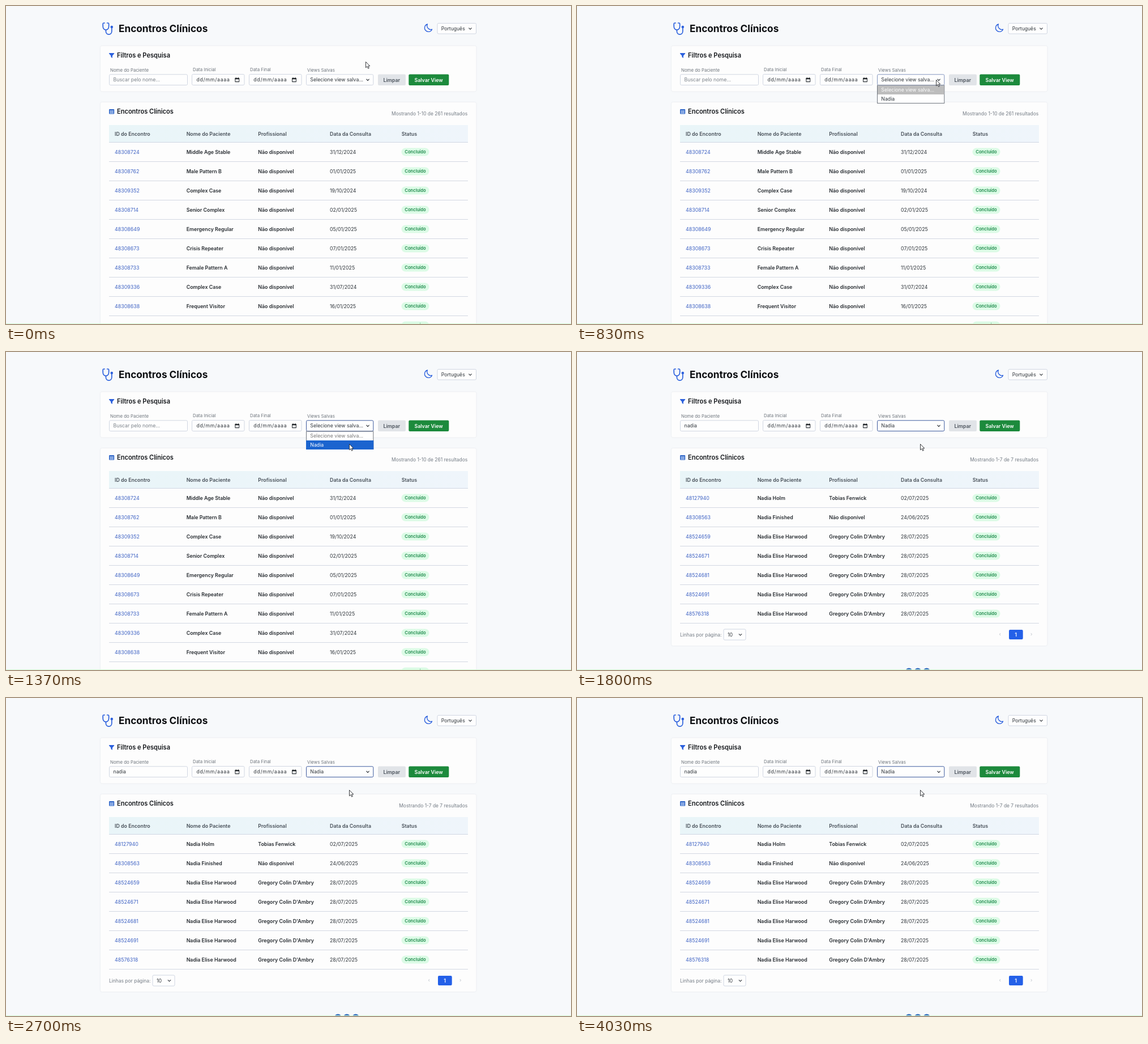
Recreate the animation shown at these times as an HTML page. Size 998x561 px, loop 4060 ms.

```html
<!DOCTYPE html>
<html lang="pt">
<head>
<meta charset="utf-8">
<title>Encontros Clínicos</title>
<style>
  html, body { margin: 0; width: 100%; height: 100%; overflow: hidden; background: #f7f9fb; }
  svg { display: block; width: 998px; height: 561px; }
  text { font: 400 8.75px Inter, "Open Sans", sans-serif; fill: #2f353b; white-space: pre; }
  .title { font-size: 17.2px; font-weight: 700; fill: #0b0d10; }
  .section { font-size: 11.05px; font-weight: 600; fill: #15181c; }
  .label { font-size: 7.85px; fill: #6d747c; }
  .hint { fill: #7a8189; }
  .date { letter-spacing: .7px; }
  .cell, .head, .btn { font-size: 8.85px; font-weight: 600; }
  .cell { fill: #272c31; }
  .head { fill: #474f58; }
  .day { font-size: 8.8px; }
  .id { font-size: 8.85px; fill: #3f63c4; }
  .pill { font-size: 7.6px; font-weight: 600; fill: #1f8a4c; }
  .note { font-size: 8.45px; fill: #737b84; }
  .end { text-anchor: end; }
  .mid { text-anchor: middle; }
  .white { fill: #fff; }
  .card { fill: #fdfdfd; filter: drop-shadow(0 .5px 1.2px rgb(60 70 90 / .13)); }
  .box { fill: #fefefe; stroke: #d0d6e2; }
  .icon { fill: none; stroke: #2b60dd; stroke-width: 1.7; stroke-linecap: round; stroke-linejoin: round; }
  .thin { fill: none; stroke: #33383e; stroke-width: 1.1; stroke-linecap: round; stroke-linejoin: round; }

  .before, .after, .idle, .chosen, .menu, .rest, .hover { animation: 4060ms step-end infinite; }
  .before { animation-name: before; }
  .after { animation-name: after; }
  .idle { animation-name: idle; }
  .chosen { animation-name: chosen; }
  .menu { animation-name: menu; }
  .rest { animation-name: rest; }
  .hover { animation-name: hover; }
  .focus { animation: focus 4060ms linear infinite; }
  .cursor { animation: move 4060ms ease-in-out infinite; }
  @keyframes before { 0% { opacity: 1 } 41.87%, 100% { opacity: 0 } }
  @keyframes after { 0% { opacity: 0 } 41.87%, 100% { opacity: 1 } }
  @keyframes idle { 0% { opacity: 1 } 40.15%, 100% { opacity: 0 } }
  @keyframes chosen { 0% { opacity: 0 } 40.15%, 100% { opacity: 1 } }
  @keyframes menu { 0% { opacity: 0 } 18.97% { opacity: 1 } 40.15%, 100% { opacity: 0 } }
  @keyframes rest { 0% { opacity: 1 } 27.8%, 100% { opacity: 0 } }
  @keyframes hover { 0% { opacity: 0 } 27.8%, 100% { opacity: 1 } }
  @keyframes focus { 0%, 18.5% { stroke: #d0d6e2 } 22.2%, 100% { stroke: #3d5a9e } }
  @keyframes move {
    0%, .74% { transform: translate(635px, 98px) }
    10.59%, 22.17% { transform: translate(634px, 130px) }
    30.79%, 100% { transform: translate(606px, 162px) }
  }
</style>
</head>
<body>
<svg viewBox="0 0 998 561">
  <defs>
    <linearGradient id="bar">
      <stop offset="0" stop-color="#e9f5f8"/>
      <stop offset="1" stop-color="#eff5fb"/>
    </linearGradient>
    <path id="chevron" class="thin" d="M-2.3-1.1 0 1.2 2.3-1.1"/>
    <g id="calendar">
      <path class="thin" stroke-linecap="butt" d="M.6 1.6h6.8v6H.6z"/>
      <path d="M.4 1h7.2v2.2H.4zM1.5 0h1.2v1.2H1.5zM5.3 0h1.2v1.2H5.3z" fill="#24282c"/>
    </g>
  </defs>
  <rect width="998" height="561" fill="#f7f9fb"/>

  <!-- Page header -->
  <path class="icon" d="M174.2 30h-1.6q-1.4 0-1.4 1.6v4.2c0 4 2.5 6.3 5.2 6.3s5.2-2.3 5.2-6.3v-4.2q0-1.6-1.4-1.6h-1.6M176.4 42.3v2.2c0 3.600 2.400 5.600 5.200 5.600s5.200-2 5.200-5.600v-5.200"/>
  <circle cx="186.800" cy="37" r="2.300" fill="#2b60dd"/>
  <text class="title" x="199" y="46.200">Encontros Clínicos</text>
  <path class="icon" style="stroke-width:1.300" d="M744.500 32a6.800 6.800 0 1 0 8 9.200 6.600 6.600 0 0 1-8-9.200z"/>
  <rect class="box" x="762" y="30.500" width="68.500" height="18.500" rx="2"/>
  <text x="768.800" y="43.100" style="font-size:8.650px">Português</text>
  <use href="#chevron" x="820" y="40"/>

  <!-- Filters -->
  <rect class="card" x="167" y="70.500" width="663.500" height="80" rx="3"/>
  <path d="M182.300 83h8.600q.7.400.2 1l-3.200 3.800v4l-2.600-1.800v-2.200l-3.300-3.800q-.4-.7.300-1z" fill="#2b60dd"/>
  <text class="section" x="196" y="91.300">Filtros e Pesquisa</text>
  <text class="label" x="184" y="116.200">Nome do Paciente</text>
  <text class="label" x="330" y="115.400">Data Inicial</text>
  <text class="label" x="431" y="115.400">Data Final</text>
  <text class="label" x="532" y="116.200">Views Salvas</text>
  <rect class="box" x="182.500" y="120.800" width="138" height="18.700" rx="2"/>
  <text class="hint before" x="189.500" y="133.400">Buscar pelo nome...</text>
  <text class="after" x="189.500" y="133.400">nadia</text>
  <rect class="box" x="328.500" y="120.500" width="92.500" height="19" rx="2"/>
  <text class="date" x="336.500" y="133.400">dd/mm/aaaa</text>
  <use href="#calendar" x="404.300" y="126"/>
  <rect class="box" x="429.500" y="120.500" width="92.500" height="19" rx="2"/>
  <text class="date" x="437.300" y="133.400">dd/mm/aaaa</text>
  <use href="#calendar" x="505" y="126"/>
  <rect class="box focus" x="530.500" y="120.800" width="118.300" height="18.700" rx="2"/>
  <text class="idle" x="537.300" y="133.400">Selecione view salva...</text>
  <text class="chosen" x="537.300" y="133.400">Nadia</text>
  <use href="#chevron" x="639" y="130.300"/>
  <rect x="657" y="120.500" width="49" height="19.500" rx="2" fill="#e1e4e8"/>
  <text class="btn mid" x="681.300" y="133.500" style="fill:#4a525b">Limpar</text>
  <rect x="711.300" y="120.500" width="71" height="19.500" rx="2" fill="#1c8a3c"/>
  <text class="btn mid white" x="746.600" y="133.500">Salvar View</text>

  <!-- Results -->
  <rect class="card before" x="167" y="170" width="663.500" height="420" rx="3"/>
  <rect class="card after" x="167" y="170" width="663.500" height="348" rx="3"/>
  <rect x="182" y="182" width="9.200" height="8.500" rx="1" fill="#2f66c8"/>
  <path d="M183 184.800h7.200M183 186.900h7.200M183 189h7.200M185.200 184.200v5.600M188 184.200v5.600" stroke="#dbe7fb" stroke-width=".7"/>
  <text class="section" x="196" y="190.100">Encontros Clínicos</text>
  <text class="note end before" x="815.300" y="193">Mostrando 1-10 de 261 resultados</text>
  <text class="note end after" x="815.300" y="193">Mostrando 1-7 de 7 resultados</text>
  <rect x="182" y="210" width="634" height="30" fill="url(#bar)"/>
  <rect x="182" y="240" width="634" height="1" fill="#d0d7e4"/>
  <g id="head"></g>
  <g id="all" class="before"></g>
  <g id="found" class="after">
    <text class="note" x="182" y="501.500">Linhas por página:</text>
    <rect class="box" x="259" y="489" width="39" height="19" rx="2"/>
    <text x="266" y="501.700">10</text>
    <use href="#chevron" x="288.500" y="498.700"/>
    <text class="mid" x="747.200" y="501.300" style="fill:#b9bfc7">‹</text>
    <rect x="763" y="490" width="24.700" height="17" rx="2" fill="#2460e8"/>
    <text class="btn mid white" x="775.200" y="501.700">1</text>
    <text class="mid" x="802.800" y="501.300" style="fill:#b9bfc7">›</text>
    <g fill="#2f6dbd">
      <circle cx="586.300" cy="564" r="6.500"/>
      <circle cx="602" cy="564" r="6.500"/>
      <circle cx="617.700" cy="564" r="6.500"/>
    </g>
  </g>
  <rect y="560" width="998" height="1" fill="#d4fbd7"/>

  <!-- Saved views menu -->
  <g class="menu">
    <rect x="530.500" y="140" width="118.300" height="31.500" fill="#fff" stroke="#6f757e"/>
    <g class="rest">
      <rect x="531" y="140.500" width="117.300" height="15.500" fill="#bdbdbd"/>
      <text class="white" x="537.300" y="151.300">Selecione view salva...</text>
      <text x="537.300" y="166.900">Nadia</text>
    </g>
    <g class="hover">
      <text x="537.300" y="151.300" style="fill:#777">Selecione view salva...</text>
      <rect x="530" y="156" width="119.300" height="16" fill="#1b64cf"/>
      <text class="white" x="537.300" y="166.900">Nadia</text>
    </g>
  </g>

  <path class="cursor" d="M.5.5v10.300l2.400-2.200 1.700 3.700 1.700-.8-1.700-3.600h3.200z" fill="#fff" stroke="#25282c" stroke-width=".9" stroke-linejoin="round"/>
</svg>
<script>
  const NONE = "Não disponível";
  const columnX = i => 192 + i * 126.67;
  const label = (x, y, cls, str) => `<text x="${x}" y="${y}" class="${cls}">${str}</text>`;

  function row([id, name, staff, day], i) {
    const y = 257.500 + i * 34;
    const base = y + 3.2;
    return label(columnX(0), base, "id", id)
      + label(columnX(1), base, "cell", name)
      + label(columnX(2), base, "cell", staff)
      + label(columnX(3), base, "day", day)
      + `<rect x="698.500" y="${y - 7}" width="49" height="14" rx="7" fill="#dcfbe6"/>`
      + label(723, y + 2.7, "pill mid", "Concluído")
      + `<rect x="182" y="${Math.floor(y + 17)}" width="634" height="1" fill="#d3d8e2"/>`;
  }

  const all = [
    ["48308724", "Middle Age Stable", NONE, "31/12/2024"],
    ["48308762", "Male Pattern B", NONE, "01/01/2025"],
    ["48309352", "Complex Case", NONE, "19/10/2024"],
    ["48308714", "Senior Complex", NONE, "02/01/2025"],
    ["48308649", "Emergency Regular", NONE, "05/01/2025"],
    ["48308673", "Crisis Repeater", NONE, "07/01/2025"],
    ["48308733", "Female Pattern A", NONE, "11/01/2025"],
    ["48309336", "Complex Case", NONE, "31/07/2024"],
    ["48308638", "Frequent Visitor", NONE, "16/01/2025"],
    ["48308156", "Super Utilizer", NONE, "05/10/2024"]
  ];
  const repeats = ["48524659", "48524671", "48524681", "48524691", "48576318"];
  const found = [
    ["48127940", "Nadia Holm", "Tobias Fenwick", "02/07/2025"],
    ["48308563", "Nadia Finished", NONE, "24/06/2025"],
    ...repeats.map(id => [id, "Nadia Elise Harwood", "Gregory Colin D'Ambry", "28/07/2025"])
  ];
  const heads = ["ID do Encontro", "Nome do Paciente", "Profissional", "Data da Consulta", "Status"];

  const fill = (id, html) => document.getElementById(id).insertAdjacentHTML("afterbegin", html);
  fill("head", heads.map((str, i) => label(columnX(i), 228.500, "head", str)).join(""));
  fill("all", all.map(row).join(""));
  fill("found", found.map(row).join(""));
</script>
</body>
</html>
```
